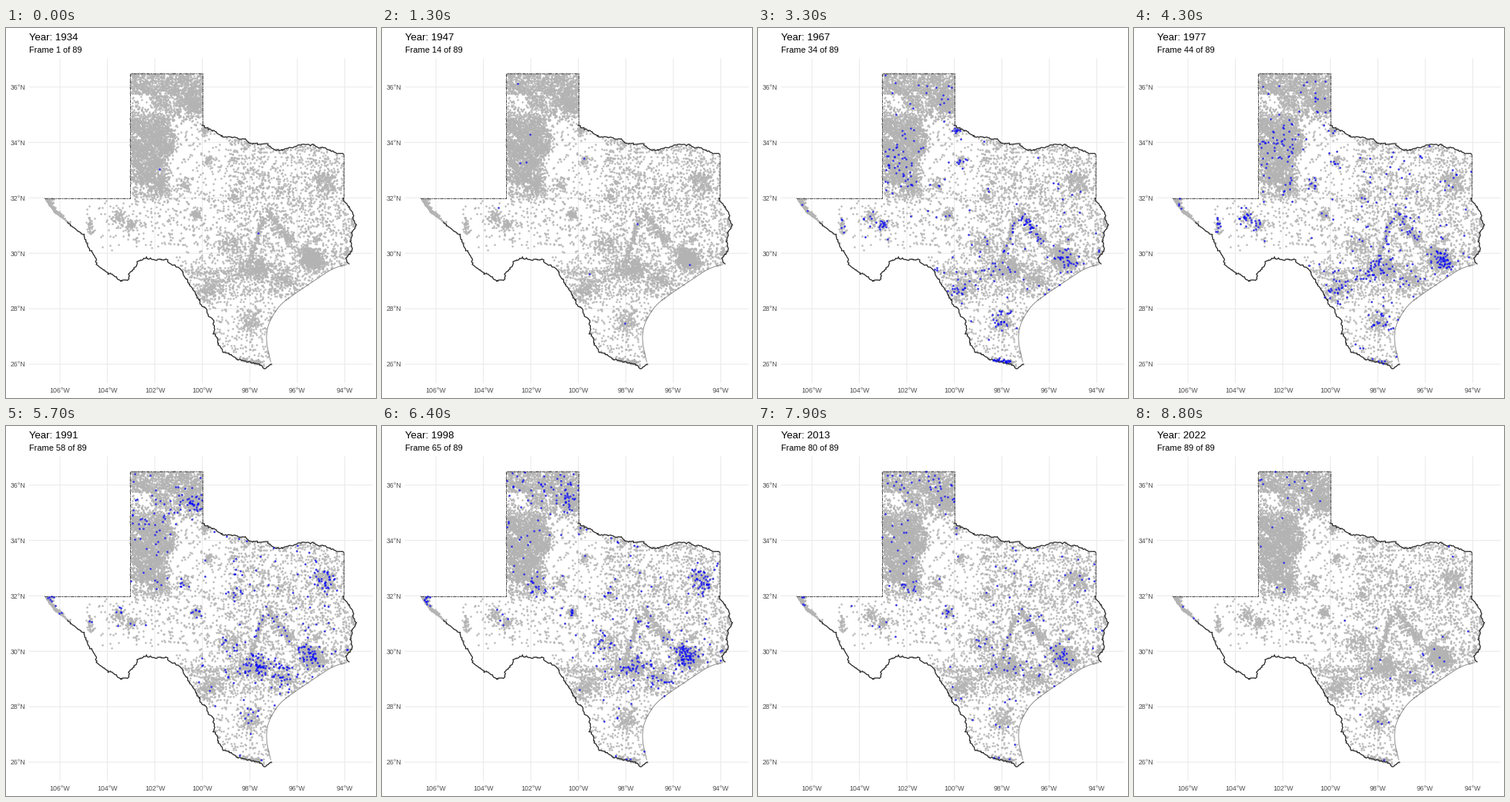
A matplotlib script for the animation above (8.9 s loop, 480 by 480 pixels).

```python
import numpy as np
import matplotlib.pyplot as plt
from matplotlib.animation import FuncAnimation
from matplotlib.path import Path

SIZE, DPI = 480, 100
PT = 72 / DPI
FIRST, YEARS = 1934, 89
plt.rcParams["font.family"] = "Liberation Sans"
rng = np.random.default_rng(12)

# State border, in stage pixels
WEST_LINE = [(50, 220.5), (161, 220.5), (161, 58.5), (254.5, 58.5), (254.5, 126)]
RED_RIVER = [(254.5, 126), (266, 133), (283, 140), (308, 143), (318, 152), (338, 150),
             (345, 157), (362, 156), (391, 151), (412, 157), (438, 164)]
EAST_LINE = [(438, 164), (438, 220.5)]
SABINE = [(438, 220.5), (449, 240), (453, 254), (447, 275), (448, 290), (442, 300),
          (445, 306)]
COAST = [(445, 306), (425, 311), (380, 341), (355, 359), (340, 383), (337, 405),
         (344, 436)]
RIO_GRANDE = [(344, 436), (335, 441), (328, 437), (304, 431), (281, 419), (270, 395),
              (269, 380), (254, 361), (240, 335), (226, 315), (211, 302), (183, 297),
              (171, 302), (158, 328), (148, 327), (118, 307), (110, 288), (102, 272),
              (80, 252), (62, 238), (50, 220.5)]
STATE = Path(WEST_LINE + RED_RIVER + EAST_LINE + SABINE + COAST + RIO_GRANDE)

# Busy places: x, y, spread, wells, peak year
PLACES = [
    (55, 226, 3, 70, 1996), (146, 245, 6, 80, 1977), (161, 255, 4, 65, 1967),
    (197, 206, 7, 140, 2005), (231, 203, 5, 50, 1977), (247, 241, 3, 65, 2005),
    (257, 133, 3.5, 45, 1967), (263, 172, 4, 45, 1965), (240, 97, 8, 150, 1991),
    (297, 216, 5, 60, 1988), (414, 200, 9, 160, 1995), (393, 298, 7, 420, 2000),
    (404, 303, 6, 200, 1977), (260, 342, 7, 130, 1972), (289, 281, 7, 110, 2003),
    (326, 312, 8, 230, 1992), (356, 325, 11, 180, 1991), (317, 382, 8, 160, 1971)]
# Busy belts: line, spread, wells, peak year
BELTS = [
    ([(53, 224), (72, 246), (84, 257)], 1.3, 150, 1930),
    ([(108, 247), (110, 266)], 2, 40, 1980),
    ([(305, 432), (330, 433)], 2, 90, 1965),
    ([(442, 282), (442, 298)], 2, 30, 1982),
    ([(300, 317), (318, 300), (329, 258), (338, 243)], 2, 190, 1978),
    ([(338, 236), (347, 248), (370, 281)], 2.2, 150, 1967),
    ([(228, 312), (250, 318), (300, 314)], 1.6, 70, 1964),
    ([(262, 334), (300, 324), (335, 305)], 4, 140, 1980)]


def along(points, t):
    """Positions at fractions t of a polyline."""
    p = np.array(points, float)
    d = np.r_[0, np.cumsum(np.hypot(*np.diff(p, axis=0).T))]
    return np.c_[np.interp(t * d[-1], d, p[:, 0]), np.interp(t * d[-1], d, p[:, 1])]


def blur(p, width):
    half = width // 2
    padded = np.pad(p, ((half, half), (0, 0)), mode="edge")
    kernel = np.ones(width) / width
    return np.c_[tuple(np.convolve(c, kernel, "valid") for c in padded.T)]


def ragged(points):
    length = np.hypot(*np.diff(np.array(points), axis=0).T).sum()
    p = along(points, np.linspace(0, 1, int(length / 1.5)))
    p += rng.normal(0, 0.45, p.shape) + blur(rng.normal(0, 2, p.shape), 5)
    p[[0, -1]] = points[0], points[-1]
    return p


def density(x, y):
    """Scattered wells per square pixel."""
    plains_edge = 205 + 15 * np.exp(-((y - 148) / 20) ** 2)
    return np.select(
        [(x < 104) | (x < 225) & (y > 284), x < 160, y < 86, (x < 190) & (y < 107),
         y < 118, (x < plains_edge) & (y < 200), (x < 212) & (y < 222),
         (x < 285) & (y < 215), (x < 290) & (y < 300), y > 345],
        [0, 0.014, 0.36, 0.05, 0.27, 0.52, 0.13, 0.022, 0.035, 0.035], 0.076)


def texture(p, waves=14):
    k, phase = rng.normal(0, 0.22, (2, waves)), rng.uniform(0, 2 * np.pi, waves)
    return np.exp(0.12 * np.sin(p @ k + phase).sum(axis=1))


def make_wells():
    spots = rng.uniform((50, 58), (455, 441), (110000, 2))
    blurred = spots + rng.normal(0, 2.5, spots.shape)
    chance = density(*blurred.T) * texture(spots) * 405 * 383 / len(spots)
    parts = [spots[rng.random(len(spots)) < chance]]
    peaks = [np.zeros(len(parts[0]))]
    for line, spread, n, peak in [([(x, y)] * 2, *rest) for x, y, *rest in PLACES] + BELTS:
        parts.append(along(line, rng.random(n)) + rng.normal(0, spread, (n, 2)))
        peaks.append(np.full(n, peak))
    p, peak = np.vstack(parts), np.concatenate(peaks)
    keep = STATE.contains_points(p)
    return p[keep], peak[keep]


wells, peak_year = make_wells()


def wells_in(year):
    """Wells drilled in one year; on the plains the drilling moves north."""
    x, y = wells.T
    level = np.interp(year, [1934, 1947, 1956, 1966, 2005, 2013, 2021, 2022],
                      [0.007, 0.06, 0.45, 1, 1, 0.8, 0.35, 0.16])
    front = np.interp(year, [1967, 2005], [185, 66])
    plains = 0.008 + 0.028 * np.exp(-((y - front) / 28) ** 2)
    others = np.where(x > 285, np.interp(year, [1967, 1977], [0.013, 0.032]), 0.024)
    scattered = np.where((x < 254) & (y < 222), plains, others)
    busy = 0.03 + 0.17 * np.exp(-((year - peak_year) / 10) ** 2)
    chance = level * np.where(peak_year > 0, busy, scattered)
    return wells[np.random.default_rng(year).random(len(wells)) < chance]


fig = plt.figure(figsize=(SIZE / DPI, SIZE / DPI), dpi=DPI, facecolor="white")
ax = fig.add_axes([0, 0, 1, 1])
ax.set_xlim(0, SIZE)
ax.set_ylim(SIZE, 0)
ax.axis("off")


def stroke(p, color, width, **kw):
    ax.plot(*np.transpose(p), color=color, lw=width * PT, **kw)


def dots(p, color, **kw):
    return ax.plot(*np.transpose(p), "o", color=color, ms=2.6 * PT, mew=0, **kw)[0]


def label(x, y, text, size, color="black", ha="left"):
    return ax.text(x, y, text, fontsize=size * PT, color=color, ha=ha, va="baseline")


for i in range(7):
    x = 69.9 + 61.6 * i
    stroke([(x, 40), (x, 460)], "#EBEBEB", 1.1, zorder=1, snap=False)
    label(x, 473, f"{106 - 2 * i}°W", 8.8, "#4D4D4D", "center")
for i in range(6):
    y = 76.6 + 71.9 * i
    stroke([(30, y), (475, y)], "#EBEBEB", 1.1, zorder=1, snap=False)
    label(25, y + 3.2, f"{36 - 2 * i}°N", 8.8, "#4D4D4D", "right")

dots(wells, "#B3B3B3", alpha=0.9, zorder=2)

for line in (WEST_LINE, EAST_LINE):
    stroke(line, "#999999", 0.7, zorder=3)
    stroke(line, "#333333", 0.8, zorder=3, dashes=(5, 2, 1.5, 2))
for line in (RED_RIVER, SABINE, RIO_GRANDE[:-2]):
    stroke(ragged(line), "#2B2B2B", 1.3, zorder=3)
stroke(RIO_GRANDE[-3:], "#808080", 0.7, zorder=1.5)
stroke(blur(along(COAST, np.linspace(0, 1, 200)), 25), "#777777", 0.8, zorder=3)

drilled = dots(np.zeros((1, 2)), "blue", alpha=0.75, zorder=4)
title = label(30, 16.3, "", 13.2)
subtitle = label(30, 32, "", 11)


def draw(i):
    drilled.set_data(*wells_in(FIRST + i).T)
    title.set_text(f"Year: {FIRST + i}")
    subtitle.set_text(f"Frame {i + 1} of {YEARS}")
    return drilled, title, subtitle


anim = FuncAnimation(fig, draw, frames=YEARS, interval=100, repeat=True, repeat_delay=0)
plt.show()
```
